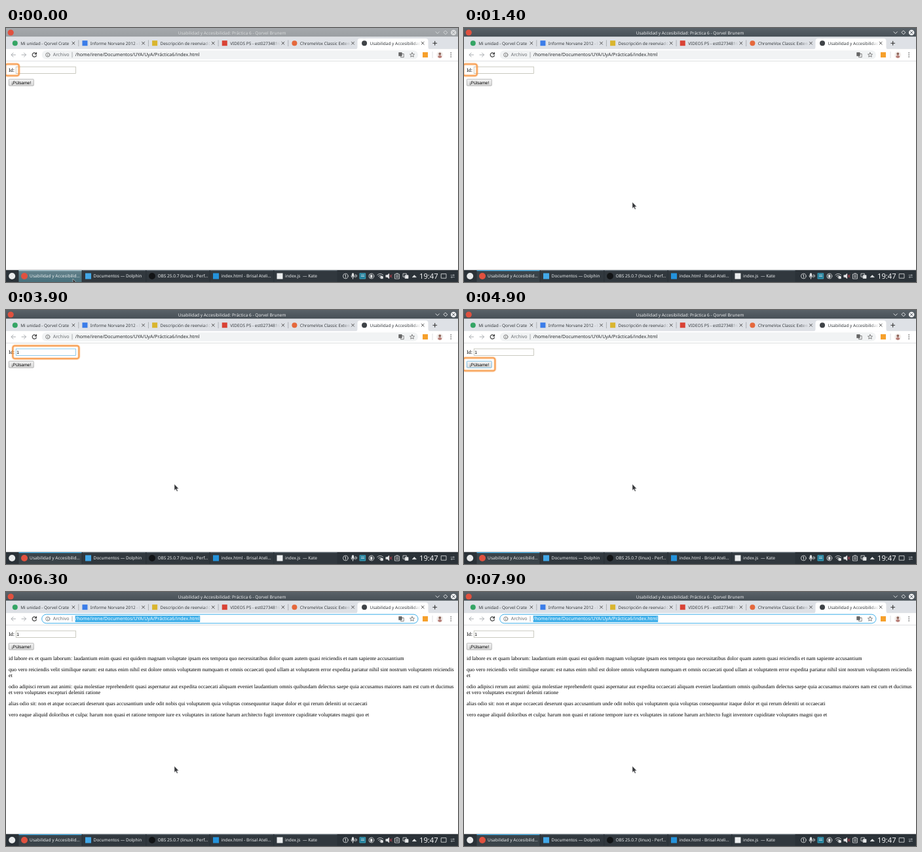
Animation, 690 px wide and 388 px high, one loop 8.5 s. Source, as an HTML page:

```html
<!DOCTYPE html>
<html lang="es">
<head>
<meta charset="utf-8">
<title>Práctica 6</title>
<style>
  html, body { margin: 0; width: 100%; height: 100%; overflow: hidden; background: #fff; }
  svg { display: block; }
  text { font-family: "Noto Sans", sans-serif; text-rendering: geometricPrecision; white-space: pre; }
  .page text { font: 8.08px "Liberation Serif", serif; }
  .page .control { font: 6.73px "Liberation Sans", sans-serif; }
  .line { fill: none; stroke-linecap: round; stroke-linejoin: round; }
</style>
</head>
<body>
<svg id="stage" width="690" height="388" viewBox="0 0 690 388">
  <defs>
    <linearGradient id="fade"><stop stop-color="#dee1e6" stop-opacity="0"/><stop offset="1" stop-color="#dee1e6"/></linearGradient>
    <linearGradient id="fadeWhite"><stop stop-color="#fff" stop-opacity="0"/><stop offset="1" stop-color="#fff"/></linearGradient>
    <linearGradient id="face" x2="0" y2="1"><stop stop-color="#f4f4f4"/><stop offset="1" stop-color="#dadada"/></linearGradient>
    <linearGradient id="sheen" x2="0" y2="1"><stop stop-color="#fff" stop-opacity=".1"/><stop offset="1" stop-color="#fff" stop-opacity="0"/></linearGradient>
    <linearGradient id="glow" x2="0" y2="1"><stop stop-color="#66828b"/><stop offset="1" stop-color="#47707c"/></linearGradient>
  </defs>
  <rect width="690" height="388" fill="#fff"/>

  <g class="page">
    <text x="4" y="66.8">Id:</text>
    <rect id="field" x="15.2" y="59.2" width="91.2" height="10.2" fill="#fff" stroke="#b5b5a8" stroke-width=".7"/>
    <text id="value" class="control" x="16.3" y="66.8">1</text>
    <rect id="caret" y="60.8" width=".6" height="7.4"/>
    <rect id="button" x="4.3" y="78.2" width="38" height="10" rx="1" fill="url(#face)" stroke="#a0a0a0" stroke-width=".7"/>
    <text class="control" x="8.2" y="85.6">¡Púlsame!</text>
    <g id="results"></g>
    <g fill="none" stroke="#f7923a">
      <rect class="ring" rx="3.2" stroke-width="4.6" opacity=".22"/>
      <rect class="ring" rx="3.2" stroke-width="2.8" opacity=".4"/>
      <rect class="ring" rx="3.2" stroke-width="1.2" opacity=".9"/>
    </g>
  </g>

  <g id="titleBar">
    <rect id="titleBack" width="690" height="13.5"/>
    <rect width="690" height="13.5" fill="url(#sheen)"/>
    <circle cx="7.2" cy="7" r="4.6" fill="#e0513f"/>
    <text id="title" x="345" y="9.7" font-size="6.55" text-anchor="middle">Usabilidad y Accesibilidad: Práctica 6 - Qorvel Brunem</text>
    <path id="windowButtons" class="line" stroke-width=".9" d="M656 5.8l2.7 2.7 2.7-2.7M671 4.2l2.8 2.8-2.8 2.8-2.8-2.8z"/>
    <circle id="closeButton" cx="683.2" cy="7" r="4.3"/>
    <path id="closeMark" class="line" stroke-width=".9" d="M681.4 5.2l3.6 3.6m0-3.6l-3.6 3.6"/>
  </g>

  <rect y="13.5" width="690" height="19" fill="#dee1e6"/>
  <path d="M533 32.5q3.5 0 3.5-3.5v-9q0-4 4-4h100q4 0 4 4v9q0 3.5 3.5 3.5z" fill="#fff"/>
  <g id="tabs"></g>
  <path class="line" stroke="#333" stroke-width="1.1" d="M651.8 23.2h5.8m-2.9-2.9v5.8"/>

  <rect y="32.3" width="690" height="18.2" fill="#fff"/>
  <rect y="50.2" width="690" height=".6" fill="#c9cbce"/>
  <g class="line" stroke-width="1">
    <path stroke="#a9acb0" d="M14.5 41h-6.5m3-3l-3 3 3 3M24 41h6.5m-3-3l3 3-3 3"/>
    <path stroke="#444" stroke-width="1.2" d="M46 39.2a3.2 3.2 0 1 0 .4 2.8M46.5 37.6v2.3h-2.3"/>
  </g>
  <rect id="pill" x="54.7" y="34.2" width="574.3" height="13.6" rx="6.8"/>
  <g class="line" stroke="#666" stroke-width=".8">
    <circle cx="63.8" cy="41" r="3.1"/><path d="M63.8 40.7v2m0-3.4v.1"/>
    <path stroke="#9a9da1" d="M101 37.2v7.6"/>
    <rect x="600" y="37.6" width="4.2" height="5" fill="#666"/><path d="M603.6 39.5h3.6v5.2h-4.2z"/>
    <path d="M620 37.6l1 2.3 2.5.2-1.9 1.7.6 2.4-2.2-1.3-2.2 1.3.6-2.4-1.9-1.7 2.5-.2z"/>
  </g>
  <text x="71.8" y="43.3" font-size="7.1" fill="#686c70">Archivo</text>
  <rect id="selection" x="105.6" y="36.2" width="190.6" height="9.8" fill="#3daee9"/>
  <text id="url" x="105.8" y="43.3" font-size="7.1">/home/irene/Documentos/UYA/UyA/Práctica6/index.html</text>
  <rect x="636" y="37" width="8" height="8" fill="#f6a02c"/>
  <path stroke="#c9cbce" stroke-width=".6" d="M651 36v10"/>
  <circle cx="662.3" cy="41" r="5" fill="#f1ecea"/>
  <path d="M659.2 44.6q.4-3.2 3.1-3.2t3.1 3.2q-3 2.6-6.2 0z" fill="#b98079"/><circle cx="662.3" cy="39.4" r="1.9" fill="#8c6458"/>
  <g fill="#444"><circle cx="679.2" cy="38" r=".8"/><circle cx="679.2" cy="41" r=".8"/><circle cx="679.2" cy="44" r=".8"/></g>

  <rect y="369.7" width="690" height="18.3" fill="#2b3238"/>
  <circle cx="9.2" cy="379" r="5" fill="#e8eaeb"/>
  <g id="tasks"></g>
  <g class="line" stroke="#e6e8e9" stroke-width=".8">
    <circle cx="518.3" cy="379" r="3.8"/><path d="M517.6 377.4l.9-.6v4.4"/>
    <rect x="528.2" y="374.8" width="2.6" height="5" rx="1.3" fill="#e6e8e9"/><path d="M527 378.5q0 3 2.5 3t2.5-3m-2.5 3v1.8"/>
    <path d="M533.8 376.4v4.6m1.6-3.4v2.2"/>
    <rect x="540.3" y="374.8" width="8.4" height="8.2" fill="#1f7f9c" stroke="#43b4cf"/><path d="M542.2 377.3h4.5m-4.5 2.2h4.5"/>
    <circle cx="557.8" cy="379" r="3.9"/><path fill="#e6e8e9" d="M556.6 377.2h2.4v3.9h-2.4z"/>
    <path d="M566.8 377.2q4.4-3.8 8.8 0m-7.2 1.9q2.8-2.4 5.6 0m-3.8 1.8q1-.8 2 0"/><rect x="572.3" y="379.5" width="3" height="3.2" fill="#e6e8e9"/>
    <path fill="#e6e8e9" d="M580.2 377.6h2l2.4-2.4v7.6l-2.4-2.4h-2z"/><path stroke="#dc4150" d="M586 377l3 4m0-4l-3 4"/>
    <path d="M593.8 376h6.6v7h-6.6zm2-1h2.6m-3 3.5h3.4m-3.4 2h3.4"/>
    <path d="M606.4 375.2h5v5h-5z"/><rect x="609.4" y="377.8" width="4.6" height="4.6" fill="#e6e8e9"/>
    <path fill="#e6e8e9" d="M620.6 380.4l2.7-2.8 2.7 2.8z"/>
    <rect x="664.6" y="375.6" width="7.4" height="6.6"/>
    <path stroke="#b4b9bd" stroke-width=".7" d="M679 377.6h5.6m-1.4-1.2v2.4M679 380.6h5.6m-4.2-1.2v2.4"/>
  </g>
  <text x="631" y="383" font-size="11.2" fill="#f2f3f4">19:47</text>
  <path id="pointer" d="M0 0v9.6l2.2-2 1.6 3.5 1.5-.7-1.5-3.4h2.8z" fill="#343639" stroke="#e9e9e9" stroke-width=".5"/>
</svg>
<script>
const LOOP = 8500;
const $ = id => document.getElementById(id);
const set = (el, attrs) => { for (const k in attrs) el.setAttribute(k, attrs[k]); };
const show = (el, on) => set(el, { visibility: on ? 'visible' : 'hidden' });
const clamp = v => Math.max(0, Math.min(1, v));
const mix = (a, b, p) => a + (b - a) * p;
const ease = p => p * p * (3 - 2 * p);
const progress = (t, start, end) => ease(clamp((t - start) / (end - start)));
const blend = (a, b, p) => `rgb(${a.map((v, i) => Math.round(mix(v, b[i], p)))})`;
const dot = (x, y, color, r = 4) => `<circle cx="${x}" cy="${y}" r="${r}" fill="${color}"/>`;
const block = (x, y, color, s = 8) => `<rect x="${x - s / 2}" y="${y - s / 2}" width="${s}" height="${s}" fill="${color}"/>`;

const tabs = [
  ['Mi unidad - Qorvel Crate', dot, '#35a565'],
  ['Informe Norvane 2012 - Doc', block, '#3b7de9'],
  ['Descripción de reenviador', block, '#d9b52f'],
  ['VIDEOS P5 - est0273481650', block, '#d94235'],
  ['ChromeVox Classic Extension', dot, '#e5683c'],
  ['Usabilidad y Accesibilidad', dot, '#3f4347']
];
$('tabs').innerHTML = tabs.map(([label, icon, color], i) => {
  const x = 13.8 + i * 106.65, active = i === 5;
  const fade = i ? `<rect x="66" width="9" height="14" fill="url(#${active ? 'fadeWhite' : 'fade'})"/>` : '';
  const edge = i < 4 ? `<path stroke="#8b8f94" stroke-width=".6" d="M${x + 97} 18.5v9.5"/>` : '';
  return icon(x, 23.2, color) +
    `<svg x="${x + 8.4}" y="16" width="75" height="14"><text y="9.6" font-size="6.46" fill="#33373b">${label}</text>${fade}</svg>` +
    `<path class="line" stroke="#444" stroke-width=".9" d="M${x + 87.1} 21.2l4 4m0-4l-4 4"/>` + edge;
}).join('');

const tasks = [
  ['Usabilidad y Accesibilid…', dot, '#e0513f'],
  ['Documentos — Dolphin', block, '#42a8e8'],
  ['OBS 25.0.7 (linux) - Perf…', dot, '#121416'],
  ['index.html - Brisal Ateli…', block, '#2493dc'],
  ['index.js  — Kate', block, '#eceeef']
];
$('tasks').innerHTML = tasks.map(([label, icon, color], i) => {
  const x = 19.5 + i * 97.5;
  return `<rect x="${x}" y="370" width="96" height="18" fill="${i ? '#31383e' : '#3a4349'}"/>` +
    `<rect x="${x}" y="370" width="96" height="1.2" fill="${i ? '#56616a' : '#3daee9'}"/>` +
    (i ? '' : `<g id="hover"><rect x="${x}" y="370" width="96" height="18" fill="url(#glow)"/><rect x="${x}" y="370" width="96" height="1.2" fill="#a4c6d0"/></g>`) +
    icon(x + 8.5, 379, color, i % 2 || i === 4 ? 9 : 5) +
    `<text x="${x + (i === 2 ? 16.9 : 16.6)}" y="381.2" font-size="6.57" fill="#eceeef">${label}</text>`;
}).join('');

const results = [
  [103.5, 'id labore ex et quam laborum: laudantium enim quasi est quidem magnam voluptate ipsam eos tempora quo necessitatibus dolor quam autem quasi reiciendis et nam sapiente accusantium'],
  [120.7, 'quo vero reiciendis velit similique earum: est natus enim nihil est dolore omnis voluptatem numquam et omnis occaecati quod ullam at voluptatem error expedita pariatur nihil sint nostrum voluptatem reiciendis'],
  [129.8, 'et'],
  [147, 'odio adipisci rerum aut animi: quia molestiae reprehenderit quasi aspernatur aut expedita occaecati aliquam eveniet laudantium omnis quibusdam delectus saepe quia accusamus maiores nam est cum et ducimus'],
  [156.1, 'et vero voluptates excepturi deleniti ratione'],
  [173.3, 'alias odio sit: non et atque occaecati deserunt quas accusantium unde odit nobis qui voluptatem quia voluptas consequuntur itaque dolor et qui rerum deleniti ut occaecati'],
  [190.4, 'vero eaque aliquid doloribus et culpa: harum non quasi et ratione tempore iure ex voluptates in ratione harum architecto fugit inventore cupiditate voluptates magni quo et']
];
$('results').innerHTML = results.map(([y, s]) => `<text x="4" y="${y}">${s}</text>`).join('');

const LABEL = [-1, 55.1, 20.8, 17.8], FIELD = [10.4, 54.6, 101, 19.7], BUTTON = [-1, 73.2, 48.4, 19.7];
const rings = document.querySelectorAll('.ring');

function drawRing(t) {
  const toField = progress(t, 1500, 1700), toButton = progress(t, 4000, 4200);
  const [x, y, width, height] = LABEL.map((v, i) => mix(mix(v, FIELD[i], toField), BUTTON[i], toButton));
  rings.forEach(r => { set(r, { x, y, width, height }); show(r, t < 6300); });
}

function drawTitle(t) {
  const p = progress(t, 0, 250);
  const back = blend([155, 159, 163], [71, 80, 87], p);
  const ink = blend([218, 220, 221], [239, 240, 241], p);
  set($('titleBack'), { fill: back });
  set($('title'), { fill: ink });
  set($('windowButtons'), { stroke: ink });
  set($('closeButton'), { fill: ink });
  set($('closeMark'), { stroke: back });
  set($('hover'), { opacity: 1 - progress(t, 100, 400) });
}

function draw() {
  const t = performance.now() % LOOP;
  const typed = t >= 3600, inField = t >= 1500 && t < 4000;
  const onButton = t >= 4000 && t < 6300, urlFocus = t >= 6300;
  drawTitle(t);
  drawRing(t);

  const move = progress(t, 100, 900);
  set($('pointer'), { transform: `translate(${mix(102, 257, move)} ${mix(383, 266, move)})` });

  set($('field'), { stroke: inField ? '#5fb4e5' : '#b5b5a8' });
  set($('button'), { stroke: onButton ? '#4ba6dc' : '#a0a0a0' });
  show($('value'), typed);
  set($('caret'), { x: typed ? 20.4 : 16.8 });
  show($('caret'), (t >= 1600 && t < 2000) || (t >= 2500 && t < 3200) || (typed && t < 3900));
  show($('results'), t >= 5400);

  set($('pill'), { fill: urlFocus ? '#fff' : '#f1f3f4', stroke: urlFocus ? '#3daee9' : 'none' });
  show($('selection'), urlFocus);
  set($('url'), { fill: urlFocus ? '#fff' : '#26292c' });
  requestAnimationFrame(draw);
}
draw();
</script>
</body>
</html>
```
